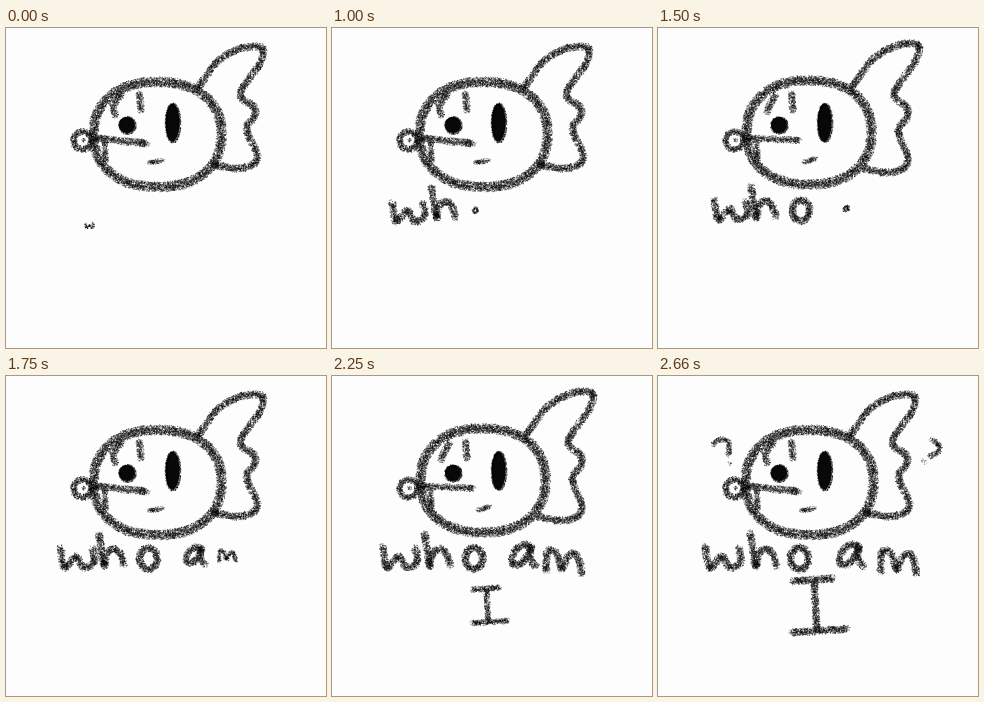
An HTML page with a canvas that plays this animation: 320 by 320 pixels, repeating every 10 s.

```html
<!DOCTYPE html>
<html lang="en">
<head>
<meta charset="utf-8">
<title>who am I</title>
<style>
  html, body { margin: 0; width: 100%; height: 100%; overflow: hidden; background: #fdfdfd; }
  canvas { display: block; width: 100vw; height: 100vh; }
</style>
</head>
<body>
<canvas id="stage" width="320" height="320"></canvas>
<script>
const SIZE = 320, LOOP = 10000, LAST = 32, INK = '#080808', PAPER = '#fdfdfd';
const stage = document.getElementById('stage').getContext('2d');

const clamp = t => Math.max(0, Math.min(1, t));
const lerp = (a, b, t) => a + (b - a) * t;
const easeOut = (t, power) => 1 - (1 - clamp(t)) ** power;
// "x,y x,y" -> [[x, y], ...]
const path = text => text.split(' ').map(p => p.split(',').map(Number));

function seeded(seed) {
  let s = seed * 7919 + 12345;
  return () => {
    s = (s + 0x6D2B79F5) | 0;
    let t = Math.imul(s ^ (s >>> 15), 1 | s);
    t = (t + Math.imul(t ^ (t >>> 7), 61 | t)) ^ t;
    return ((t ^ (t >>> 14)) >>> 0) / 4294967296;
  };
}

// Closed superellipse; exponent 2 is a plain ellipse.
function oval(cx, cy, rx, ry, exponent = 2, steps = 24) {
  const bend = v => Math.sign(v) * Math.abs(v) ** (2 / exponent);
  return Array.from({ length: steps + 1 }, (_, i) => {
    const a = (i % steps) / steps * 2 * Math.PI;
    return [cx + bend(Math.cos(a)) * rx, cy + bend(Math.sin(a)) * ry];
  });
}

function spline(a, b, c, d, t) {
  return 0.5 * (2 * b + (c - a) * t + (2 * a - 5 * b + 4 * c - d) * t * t
    + (3 * b - a - 3 * c + d) * t * t * t);
}

// Scatter soft charcoal grains along a smooth curve.
function chalk(ctx, rnd, width, pts) {
  const last = pts.length - 1;
  const closed = last > 2 && pts[0].join() === pts[last].join();
  const at = i => closed ? pts[(i + last) % last] : pts[Math.max(0, Math.min(last, i))];
  for (let i = 0; i < last; i++) {
    const [a, b, c, d] = [at(i - 1), at(i), at(i + 1), at(i + 2)];
    const grains = Math.ceil(Math.hypot(c[0] - b[0], c[1] - b[1]) * width * 1.8);
    for (let g = 0; g < grains; g++) {
      const t = rnd(), angle = rnd() * 2 * Math.PI;
      const r = rnd() ** 0.6 * width / 2;
      const x = spline(a[0], b[0], c[0], d[0], t) + Math.cos(angle) * r;
      const y = spline(a[1], b[1], c[1], d[1], t) + Math.sin(angle) * r;
      ctx.globalAlpha = 0.3 + rnd() * 0.4;
      ctx.fillRect(x, y, 1, 1);
    }
  }
  ctx.globalAlpha = 1;
}

function eye(ctx, rnd, cx, cy, rx, ry) {
  ctx.beginPath();
  ctx.ellipse(cx, cy, rx - 1, ry - 1, 0, 0, 2 * Math.PI);
  ctx.fill();
  chalk(ctx, rnd, 2.5, oval(cx, cy, rx - 1, ry - 1));
}

// The fish has two drawings: sway 0 and sway 1.
function drawFish(sway) {
  const canvas = document.createElement('canvas');
  canvas.width = canvas.height = SIZE;
  const ctx = canvas.getContext('2d'), rnd = seeded(sway + 1);
  ctx.fillStyle = INK;
  const line = (width, pts) => chalk(ctx, rnd, width, pts);

  line(10.5, oval(151 - sway / 2, 106 - 2 * sway, 64 - 1.5 * sway, 52.5 - sway / 2, 2.25));

  const tail = path('191,60 211,33 232,21 247,18 256,20 254,34 234,65 247,78 248,88 240,101 250,124 248,135 230,140 207,136');
  line(8, tail.map(([x, y]) => [
    x + sway * (4 - 0.05 * (y - 20)),
    y + sway * (0.06 * (y - 20) - 3)
  ]));

  line(7.5, [[115 + 2 * sway, 66], [107 + 4 * sway, 77], [109, 87 - 3 * sway]]);
  line(7.5, [[133, 65], [134.5, 82]]);
  line(8 - sway, [[88, 109.5], [140, 115 - 3 * sway]]);
  line(6.5, [[98, 113], [99, 132]]);
  line(5.5, [[143 + 2 * sway, 134], [156 + sway, 132 - 2 * sway]]);
  line(7 - sway / 2, oval(76, 112, 9, 9));
  line(4.5, [[76, 112], [78, 112]]);
  eye(ctx, rnd, 121, 97, 9, 9);
  eye(ctx, rnd, 166.5, 94.5, 8, 20);
  return canvas;
}
const fish = [drawFish(0), drawFish(1)];

// Shapes live in a -1..1 box. Each letter is born small at `from`, grows to
// `size` and drifts to `to` over `settle` steps.
const question = [path('-.75,-.65 -.15,-1 .5,-.75 .5,.25'), path('.62,1 .7,1')];
const letters = [
  { born: 0, settle: 32, from: [83, 197], to: [65, 181], size: [18, 12],
    strokes: [path('-1,-.9 -.75,.85 -.1,-.1 .35,.85 .95,.4 .85,-.8')] },
  { born: 6, settle: 12, from: [117, 184], to: [105, 174], size: [13, 17],
    strokes: [path('-1,-1 -.6,.9 -.4,.2 .2,-.1 .7,.2 1,.9')] },
  { born: 12, settle: 20, from: [143, 182], to: [141, 182], size: [9, 11],
    strokes: [oval(0, 0, 1, 1)] },
  { born: 18, settle: 14, from: [188, 180], to: [193, 179], size: [12.5, 11],
    strokes: [path('.6,-.8 0,-1 -.8,-.3 -.9,.7 -.3,.8 .3,0 .6,-.8 .5,.3 1,1')] },
  { born: 20, settle: 12, from: [219, 177], to: [240, 185], size: [18, 13],
    strokes: [path('-1,.8 -.9,-.8 -.4,-.6 -.1,.6 .2,-.3 .6,-.6 .9,.1 1,1')] },
  { born: 25, settle: 7, from: [156, 229], to: [161, 229], size: [27, 27],
    strokes: [path('-1,-.9 .5,-1'), path('-.2,-.9 -.1,.9'), path('-1,1 1,.87')] },
  { born: 28, settle: 4, from: [66, 79], to: [64, 75], size: [12, 12],
    brush: 6, strokes: question },
  { born: 28, settle: 4, from: [268, 79], to: [271, 74], size: [10.5, 10.5],
    brush: 6, turn: Math.PI / 3, strokes: question }
];

function drawLetter(rnd, letter, step) {
  const { born, settle, from, to, size, strokes, brush = 8, turn = 0 } = letter;
  const age = step - born;
  if (age < 0) return;
  const grown = lerp(0.25, 1, easeOut(age / Math.min(6, settle), 2)) * lerp(0.88, 1, step / LAST);
  const cx = lerp(from[0], to[0], clamp(age / settle));
  const cy = lerp(from[1], to[1], easeOut(age / settle, 4));
  const [cos, sin] = [Math.cos(turn), Math.sin(turn)];
  const place = ([x, y]) => {
    const [dx, dy] = [x * size[0] * grown, y * size[1] * grown];
    return [cx + dx * cos - dy * sin, cy + dx * sin + dy * cos];
  };
  const width = brush * Math.min(1, 0.1 + grown * 1.05);
  strokes.forEach(pts => chalk(stage, rnd, width, pts.map(place)));
}

function draw(step) {
  stage.fillStyle = PAPER;
  stage.fillRect(0, 0, SIZE, SIZE);
  stage.drawImage(fish[Math.floor(step / 2) % 2], 0, 0);
  stage.fillStyle = INK;
  const rnd = seeded(step + 50);
  letters.forEach(letter => drawLetter(rnd, letter, step));
}

// Twelve steps per second, rounded down to 10 ms, then a long hold.
function stepAt(time) {
  const centis = Math.floor(time / 10);
  return Math.min(LAST, Math.ceil(3 * (centis + 1) / 25) - 1);
}

const start = performance.now();
let shown = -1;

function tick() {
  const step = stepAt((performance.now() - start) % LOOP);
  if (step !== shown) draw(shown = step);
  requestAnimationFrame(tick);
}
tick();
</script>
</body>
</html>
```
